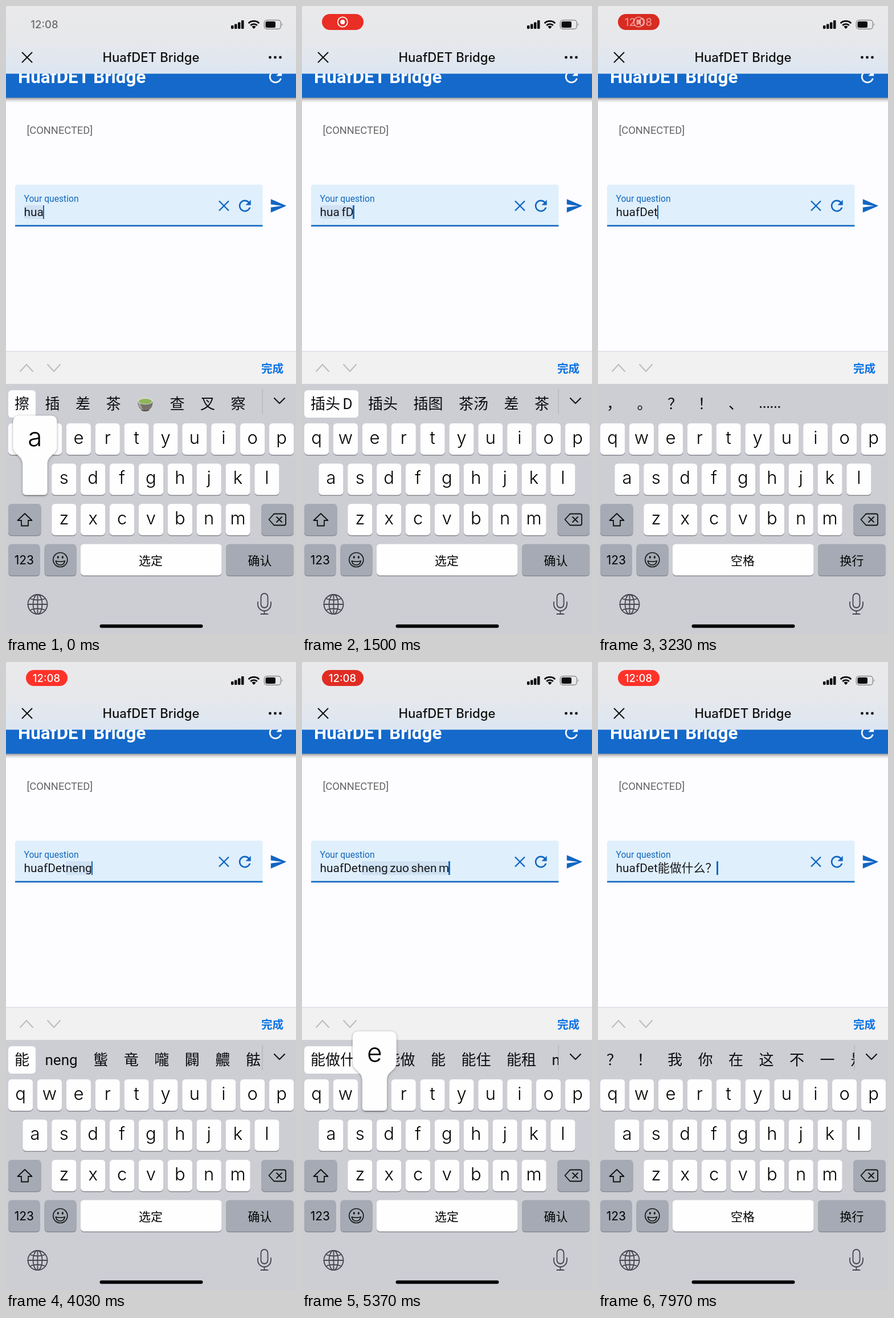
Write an HTML page that moves like this. It is 509 px wide and 1100 px high and loops after 8 s.

```html
<!DOCTYPE html>
<html lang="zh-CN">
<head>
<meta charset="utf-8">
<title>Chat input</title>
<style>
html, body { margin: 0; width: 100%; height: 100%; overflow: hidden; background: #fdfcff; }
#stage { position: absolute; left: 0; top: 0; width: 509px; height: 1100px; overflow: hidden;
  font-family: Roboto, "Noto Sans CJK SC", "Noto Sans CJK", sans-serif; }
svg.layer { position: absolute; left: 0; top: 0; width: 509px; height: 1100px; }
.ui { font-family: Inter, "Noto Sans CJK SC", "Noto Sans CJK", sans-serif; }
.mid { text-anchor: middle; }
.line { fill: none; stroke-linecap: round; stroke-linejoin: round; }
.key { fill: #fefefe; }
.dark { fill: #a5aab4; }
.letter { font-size: 31px; font-weight: 300; }
.label { font-size: 20.9px; }

#field { position: absolute; left: 31.5px; top: 349px; height: 24px; line-height: 24px;
  font-size: 20.9px; white-space: pre; color: #16181c; }
#compose { display: inline-block; height: 24px; vertical-align: top; background: #cfe1f2; }
#caret { display: inline-block; width: 2.6px; height: 24px; margin-left: -1px;
  vertical-align: top; background: #1267c4; }
#cands { position: absolute; left: 0; top: 673px; width: 434.5px; height: 48px; padding-left: 15px;
  display: flex; gap: 27.5px; overflow: hidden; line-height: 48px; font-size: 26px;
  white-space: pre; color: #0c0d10; }
#cands span { flex: none; }
#cands .dots { font-size: 23px; font-weight: 500; }
#cands.active span:first-child { margin: 0 -11px; padding: 0 11px; border-radius: 6px; background: #fefefe; }
#cands svg { width: 31px; height: 30px; margin-top: 9px; display: block; }
#pop path { fill: #fefefe; filter: drop-shadow(0 1px 2px rgba(0,0,0,.35)); }
#pop text { font-size: 46px; font-weight: 300; }

/* Recording badge */
#clock { animation: clock 8s linear infinite; }
#badge { animation: badge 8s linear infinite; }
#pill { animation: pulse 2s ease-in-out infinite; }
#rec { animation: rec 8s linear infinite; }
#time { animation: time 8s linear infinite; }
@keyframes clock { 0% { opacity: .58 } 4%, 100% { opacity: 0 } }
@keyframes badge { 0%, 4% { opacity: 0 } 7%, 100% { opacity: 1 } }
@keyframes pulse { 0%, 100% { fill: #ff3229 } 50% { fill: #d32a20 } }
@keyframes rec { 0%, 38.6% { opacity: 1 } 42.2%, 100% { opacity: 0 } }
@keyframes time { 0%, 38.6% { opacity: 0 } 42.2%, 100% { opacity: 1 } }
</style>
</head>
<body>
<div id="stage">
  <svg class="layer" viewBox="0 0 509 1100">
    <defs>
      <linearGradient id="nav" x1="0" y1="0" x2="0" y2="1">
        <stop offset="0" stop-color="#e9e9eb"/><stop offset=".5" stop-color="#e7e8eb"/>
        <stop offset="1" stop-color="#dce6f2"/>
      </linearGradient>
      <linearGradient id="shade" x1="0" y1="0" x2="0" y2="1">
        <stop offset="0" stop-color="#000" stop-opacity=".42"/><stop offset=".5" stop-color="#000" stop-opacity=".16"/>
        <stop offset="1" stop-color="#000" stop-opacity="0"/>
      </linearGradient>
      <path id="reload" d="M17.65 6.35C16.2 4.9 14.21 4 12 4c-4.42 0-7.99 3.58-7.99 8s3.57 8 7.99 8c3.73 0 6.84-2.55 7.73-6h-2.08c-.82 2.33-3.04 4-5.65 4-3.31 0-6-2.69-6-6s2.69-6 6-6c1.66 0 3.14.69 4.22 1.78L13 11h7V4z"/>
    </defs>
    <rect width="509" height="1100" fill="#fdfcff"/>

    <!-- App bar, partly under the navigation bar -->
    <rect y="160" width="509" height="9" fill="url(#shade)"/>
    <rect y="110" width="509" height="50.6" fill="#1469ca"/>
    <g fill="#fff">
      <text x="21" y="135" font-size="31.3" font-weight="600">HuafDET Bridge</text>
      <use href="#reload" transform="translate(456.2 107.2) scale(1.4)"/>
    </g>
    <rect width="509" height="118.6" fill="url(#nav)"/>
    <text class="ui mid" x="254.5" y="98" font-size="22.2" font-weight="500" fill="#111">HuafDET Bridge</text>
    <path class="line" d="M28.5 81.5l17 17m0-17l-17 17" stroke="#111" stroke-width="2"/>
    <g fill="#111"><circle cx="463.5" cy="90" r="2.4"/><circle cx="472.5" cy="90" r="2.4"/><circle cx="481.5" cy="90" r="2.4"/></g>

    <!-- Status bar -->
    <g class="ui mid" font-size="18.5" font-weight="500">
      <text id="clock" x="67.5" y="39" fill="#111">12:08</text>
      <g id="badge">
        <rect id="pill" x="35" y="14" width="73" height="28" rx="14"/>
        <g id="rec"><circle cx="71.3" cy="28" r="8.6" fill="none" stroke="#fff" stroke-width="1.8"/><circle cx="71.3" cy="28" r="4" fill="#fff"/></g>
        <text id="time" x="71" y="35" fill="#fff">12:08</text>
      </g>
    </g>
    <g fill="#0b0b0d">
      <rect x="395" y="34" width="4.5" height="6" rx="1"/><rect x="401" y="31.5" width="4.5" height="8.5" rx="1"/>
      <rect x="407" y="28.5" width="4.5" height="11.5" rx="1"/><rect x="413" y="25" width="4.5" height="15" rx="1"/>
      <path d="M435 40l-3.6-3.7a5.2 5.2 0 0 1 7.2 0z"/>
      <rect x="455.5" y="27" width="17.5" height="11" rx="2.5"/>
      <path d="M484 30q3 2.5 0 5z" fill="#999"/>
    </g>
    <path d="M425.7 30.2a13.3 13.3 0 0 1 18.6 0M429.2 34a8.3 8.3 0 0 1 11.6 0" fill="none" stroke="#0b0b0d" stroke-width="2.8"/>
    <rect x="453.3" y="24.8" width="29" height="15.4" rx="4.6" fill="none" stroke="#8b8b8e" stroke-width="1.4"/>

    <!-- Page -->
    <text x="36.5" y="224" font-size="18.3" fill="#666">[CONNECTED]</text>
    <path d="M16 385V318q0-5 5-5H445.5q5 0 5 5V385z" fill="#dfeffc"/>
    <rect x="16" y="383.6" width="434.5" height="2.6" fill="#1064bb"/>
    <text x="31.5" y="343" font-size="15.66" fill="#1268bd">Your question</text>
    <g fill="#0f66c3">
      <path d="M374 341.5l17 17m0-17l-17 17" fill="none" stroke="#0f66c3" stroke-width="2.4"/>
      <use href="#reload" transform="translate(403.6 334.4) scale(1.305)"/>
      <path transform="translate(462.2 334.4) scale(1.305)" d="M2 21L23 12 2 3v7l15 2-15 2z"/>
    </g>

    <!-- Accessory bar and keyboard -->
    <rect y="605" width="509" height="57" fill="#f1f1f2"/>
    <rect y="604.5" width="509" height="1.2" fill="#d5d6e0"/>
    <path class="line" d="M25 640l11-12 11 12M73 628l11 12 11-12" stroke="#bcbcc0" stroke-width="2"/>
    <text class="ui" x="448" y="642" font-size="19.6" font-weight="600" fill="#0a72e4">完成</text>
    <rect y="662" width="509" height="438" fill="#cdced4"/>
    <g id="more">
      <path d="M450 671v44" stroke="#b2b4bb" stroke-width="1.3"/>
      <path class="line" d="M471 687l9 9 9-9" stroke="#16171a" stroke-width="2.2"/>
    </g>
    <g class="ui mid" id="keys"></g>
    <g class="line" stroke="#45474e" stroke-width="1.8">
      <circle cx="55.5" cy="1048" r="17"/><ellipse cx="55.5" cy="1048" rx="8" ry="17"/>
      <path d="M55.5 1031v34M38.5 1048h34M42 1038q13.5 5 27 0M42 1058q13.5-5 27 0"/>
      <rect x="447.5" y="1029" width="12" height="25" rx="6"/>
      <path d="M442 1044v4a11.5 11.5 0 0 0 23 0V1044M453.5 1059.5v5.5M447.5 1065h12"/>
    </g>
    <rect x="164.5" y="1083.3" width="181" height="6" rx="3" fill="#050506"/>
  </svg>
  <div id="field"><span id="done"></span><span id="compose"></span><i id="caret"></i></div>
  <div id="cands"></div>
  <svg class="layer ui mid" id="pop" viewBox="0 0 509 1100"><path/><text></text></svg>
</div>
<script>
const LOOP = 8000, PITCH = 50.88, KEY_W = 43.2, KEY_H = 55;
const ROW_Y = [731, 801.5, 872, 942.5];
const $ = id => document.getElementById(id);

const EMOJI = {
  tea: `<svg viewBox="0 0 31 30"><ellipse cx="15.5" cy="25.5" rx="7" ry="2.5" fill="#4d4a45"/>
    <path d="M2 10q1 15 10 16h7q9-1 10-16z" fill="#77736b"/><path d="M3 13q2 11 9 12-5-6-5-12z" fill="#a7a39a"/>
    <ellipse cx="15.5" cy="10" rx="13.5" ry="6" fill="#d9d8cf"/><ellipse cx="15.5" cy="10.5" rx="11.5" ry="4.5" fill="#8fb65a"/></svg>`,
  think: `<svg viewBox="0 0 31 30"><circle cx="16" cy="14.5" r="13" fill="#fdc936"/>
    <g fill="#5b3511"><ellipse cx="11.5" cy="12" rx="1.7" ry="2.3"/><ellipse cx="20.5" cy="12" rx="1.7" ry="2.3"/></g>
    <path d="M8 8q3-2 6-.5M18 5.5q4-2 7 1M13 19q4-2 8-.5" fill="none" stroke="#5b3511" stroke-width="1.5" stroke-linecap="round"/>
    <path d="M4 19q1.500-2 3 2l8-1.500q2.500 0 1 2l-4 1.500q2 4-2 6-6 1-6-5z" fill="#f2a32e"/></svg>`
};

const CHA = "擦 插 差 茶 tea 查 叉 察", HEAD = "插头 插图 茶汤 差 茶 查 叉";
const CAP = "插头\u2006D " + HEAD, DOTS = "......", MARKS = "， 。 ？ ！ 、 " + DOTS;
const N = "你 那 呢 年 能 嗯 内 拿 南", NENG = "能 neng 螚 竜 嚨 闢 齈 䏻 嫩";
const ZUO = "能做 能 能住 能租 neng 螚 竜", WHAT = "能做什么 能做 能 能住 能租 neng";
const NAME = "huafDet", ASK = NAME + "能做什么";

// [time, committed text, text being composed, candidates, key pressed]
const steps = [[0, "", "hua", CHA, "a"]];
const type = (time, done, text, cands, key) => steps.push([time, done, text.replace(/ /g, "\u2006"), cands, key]);
type(540, "", "hua f", HEAD, "f");
type(1330, "", "hua fD", CAP, "D");
type(1850, "", "hua fDe", CAP, "e");
type(2260, "", "hua fDet", CAP, "t");
type(2760, NAME, "", MARKS);
type(3480, NAME, "n", N, "n");
type(3640, NAME, "ne", N, "e");
type(3800, NAME, "nen", NENG, "n");
type(3960, NAME, "neng", NENG, "g");
type(4300, NAME, "neng z", ZUO, "z");
type(4480, NAME, "neng zu", ZUO, "u");
type(4650, NAME, "neng zuo", ZUO, "o");
type(4830, NAME, "neng zuo s", WHAT, "s");
type(4960, NAME, "neng zuo sh", WHAT, "h");
type(5080, NAME, "neng zuo she", WHAT, "e");
type(5190, NAME, "neng zuo shen", WHAT, "n");
type(5310, NAME, "neng zuo shen m", WHAT, "m");
type(5425, NAME, "neng zuo shen me", WHAT, "e");
type(5900, ASK, "", "都 吗 think 呢 事 事情 就 的 是");
type(7420, ASK + "？", "", "？ ！ 我 你 在 这 不 一 是");

const text = (x, y, cls, s) => `<text class="${cls}" x="${x}" y="${y}">${s}</text>`;
const cap = (x, y, w, cls) =>
  `<rect x="${x}" y="${y + 1.5}" width="${w}" height="${KEY_H}" rx="6" fill="#888a90"/>
   <rect class="${cls}" x="${x}" y="${y}" width="${w}" height="${KEY_H}" rx="6"/>`;
const letterKey = (s, x, y, w = KEY_W) => cap(x, y, w, "key") + text(x + w / 2, y + 35.5, "letter", s);

const LETTERS = ["qwertyuiop", "asdfghjkl", "zxcvbnm"], ROW_X = [4, 29.3, 80.2];
const place = {};
LETTERS.forEach((row, r) => [...row].forEach((c, i) => place[c] = [ROW_X[r] + i * PITCH, ROW_Y[r]]));

function keyboard(mode, composing) {
  const upper = mode === "upper", num = mode === "num", [, , y3, y4] = ROW_Y;
  let out = "";
  if (num) {
    ["1234567890", "-/：；（）￥@“”"].forEach((row, r) =>
      [...row].forEach((c, i) => out += letterKey(c, 4 + i * PITCH, ROW_Y[r])));
    [..."。，、？！."].forEach((c, i) => out += letterKey(c, 80.3 + i * 59.6, y3, 52));
  } else {
    for (const c in place) out += letterKey(upper ? c.toUpperCase() : c, ...place[c]);
  }
  out += cap(4, y3, 57.5, upper ? "key" : "dark");
  out += num ? text(33, y3 + 35, "label", "#+=")
    : `<path class="line" d="M33 889l12.500 12h-6.500v9.500h-12v-9.500h-6.500z" stroke="#111" stroke-width="1.8" style="fill:${upper ? "#111" : "none"}"/>`;
  out += cap(448, y3, 57, "dark") +
    `<path class="line" d="M461.5 899.5l8-9q1-1 2.5-1h16q3 0 3 3v14q0 3-3 3h-16q-1.5 0-2.5-1zM475 895l9 9m0-9l-9 9" stroke="#111" stroke-width="1.8"/>`;
  out += cap(4, y4, 55.5, "dark") + text(31.8, y4 + 35, "label", num ? "拼音" : "123");
  out += cap(67.5, y4, 56, "dark") +
    `<g class="line" stroke="#111" stroke-width="1.6"><circle cx="95.3" cy="970" r="12.5"/>
     <path d="M87.3 972q8 2.4 16 0-1.500 7.200-8 7.200t-8-7.200z"/></g>
     <g fill="#111"><ellipse cx="91.300" cy="965.500" rx="1.500" ry="2.200"/><ellipse cx="99.300" cy="965.500" rx="1.500" ry="2.200"/></g>`;
  out += cap(131, y4, 247.5, "key") + text(254, y4 + 36.5, "label", composing ? "选定" : "空格");
  out += cap(386, y4, 119, "dark") + text(445.5, y4 + 36.5, "label", composing ? "确认" : "换行");
  return out;
}

function popup(c) {
  $("pop").style.display = c ? "" : "none";
  if (!c) return;
  const [x, y] = place[c.toLowerCase()], r = x + KEY_W, b = y + KEY_H;
  const mid = Math.min(466, Math.max(43, x + KEY_W / 2));
  const left = mid - 38.5, right = mid + 38.5, top = y - 84;
  const [shape, label] = $("pop").children;
  shape.setAttribute("d", `M${left + 11} ${top}H${right - 11}q11 0 11 11V${y - 30}
    C${right} ${y - 14} ${r} ${y - 16} ${r} ${y + 2}V${b - 6}q0 6 -6 6H${x + 6}q-6 0 -6 -6V${y + 2}
    C${x} ${y - 16} ${left} ${y - 14} ${left} ${y - 30}V${top + 11}q0 -11 11 -11Z`);
  label.setAttribute("x", mid);
  label.setAttribute("y", y - 31);
  label.textContent = c;
}

// Runs fn only when its arguments differ from the last call.
function onChange(fn) {
  let last;
  return (...args) => {
    const now = args.join("|");
    if (now !== last) { last = now; fn(...args); }
  };
}

const showKeys = onChange((mode, composing) => $("keys").innerHTML = keyboard(mode, composing));
const showPopup = onChange(popup);
const showText = onChange((done, composing, cands) => {
  $("done").textContent = done;
  $("compose").textContent = composing;
  $("cands").className = composing ? "active" : "";
  $("cands").innerHTML = cands.split(" ").map(s =>
    `<span class="${s === DOTS ? "dots" : ""}">${EMOJI[s] || s}</span>`).join("");
  $("more").style.display = cands === MARKS ? "none" : "";
});

const within = (t, a, b) => t >= a && t < b;
let start;
function draw(now) {
  start ??= now;
  const t = (now - start) % LOOP;
  const [, done, composing, cands] = steps.findLast(s => s[0] <= t);
  const press = steps.find(s => s[4] && within(t, s[0] - 75, s[0] + 38));
  showText(done, composing, cands);
  showKeys(within(t, 950, 1330) ? "upper" : within(t, 6950, 7420) ? "num" : "lower", composing !== "");
  showPopup(press ? press[4] : "");
  $("caret").style.visibility = within(t, 6400, 6850) ? "hidden" : "visible";
  requestAnimationFrame(draw);
}
requestAnimationFrame(draw);
</script>
</body>
</html>
```
